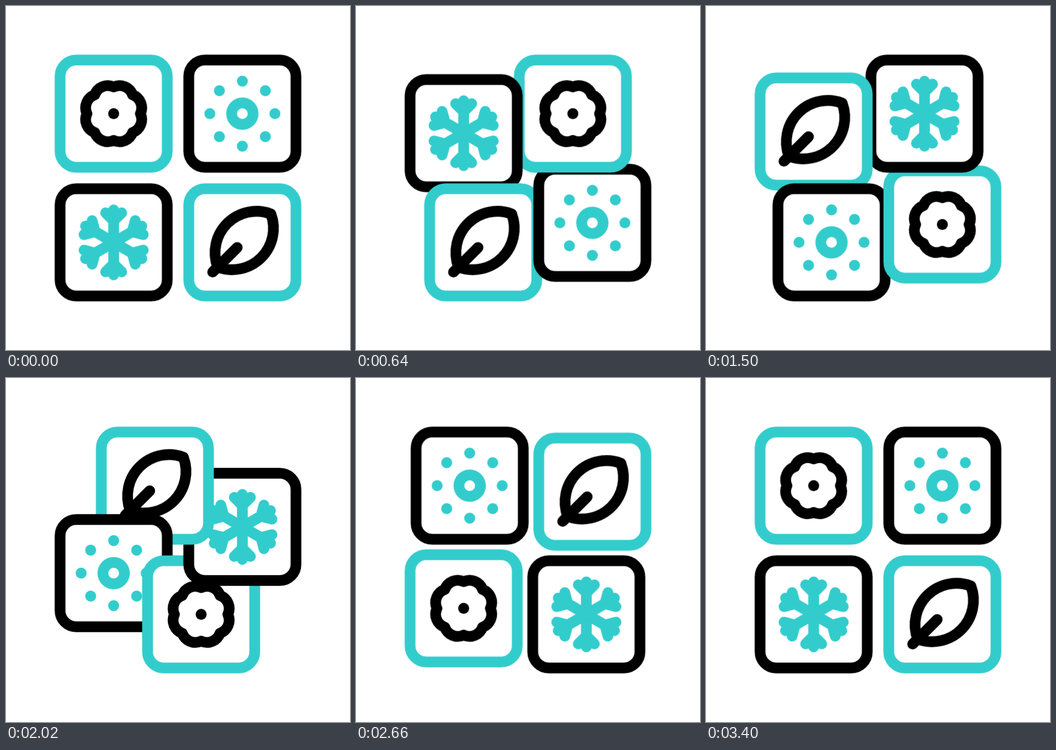
Animation, 640 px wide and 640 px high, one loop 3.8 s. Source, as an HTML page:

```html
<!DOCTYPE html>
<html lang="en">
<head>
<meta charset="utf-8">
<title>Four seasons</title>
<style>
  html, body { margin: 0; height: 100%; overflow: hidden; background: #fff; }
  svg {
    display: block; width: 100vw; height: 100vh;
    fill: none; stroke-width: 20; stroke-linecap: round; stroke-linejoin: round;
  }
  .ink { stroke: #000; }
  .teal { stroke: #33cccc; }
  .dot { stroke-width: 20.4; }
  .card { fill: #fff; }
  .orbit { animation: orbit 3800ms cubic-bezier(.3333, 0, .6667, 1) infinite; }

  /* four 850 ms moves clockwise, then a 400 ms rest */
  @keyframes orbit {
    0%, 89.4737%, 100% { transform: translate(-119.7px, -119.7px); }
    22.3684% { transform: translate(119.7px, -119.7px); }
    44.7368% { transform: translate(119.7px, 119.7px); }
    67.1053% { transform: translate(-119.7px, 119.7px); }
  }
</style>
</head>
<body>
<svg viewBox="-320 -320 640 640">
  <defs>
    <rect id="card" class="card" x="-99.7" y="-99.7" width="199.4" height="199.4" rx="30"/>

    <g id="flower">
      <use href="#card" class="teal"/>
      <path class="ink" d="M0-49.7
        A25.7 25.7 0 0 1 35.14-35.14 A25.7 25.7 0 0 1 49.7 0
        A25.7 25.7 0 0 1 35.14 35.14 A25.7 25.7 0 0 1 0 49.7
        A25.7 25.7 0 0 1-35.14 35.14 A25.7 25.7 0 0 1-49.7 0
        A25.7 25.7 0 0 1-35.14-35.14 A25.7 25.7 0 0 1 0-49.7Z"/>
      <path class="ink dot" d="M0 0h0"/>
    </g>

    <path id="rays" d="M0-60.5h0M0 60.5h0M-60.5 0h0M60.5 0h0"/>
    <g id="sun">
      <use href="#card" class="ink"/>
      <g class="teal">
        <circle r="20"/>
        <use href="#rays" class="dot"/>
        <use href="#rays" class="dot" transform="rotate(45)"/>
      </g>
    </g>

    <g id="leaf">
      <use href="#card" class="teal"/>
      <path class="ink" d="M53-53A77 77 0 0 0-46 46A77 77 0 0 0 53-53Z"/>
      <path class="ink" d="M-55.3 55.3L-9.6 9.6"/>
    </g>

    <path id="arm" d="M0 0V-60.5M-15-55L0-40L15-55"/>
    <g id="snow">
      <use href="#card" class="ink"/>
      <g class="teal">
        <use href="#arm"/>
        <use href="#arm" transform="rotate(60)"/>
        <use href="#arm" transform="rotate(120)"/>
        <use href="#arm" transform="rotate(180)"/>
        <use href="#arm" transform="rotate(240)"/>
        <use href="#arm" transform="rotate(300)"/>
      </g>
    </g>

    <clipPath id="overSun" transform="rotate(90)">
      <rect class="orbit" x="-118" y="-118" width="236" height="236"/>
    </clipPath>
  </defs>

  <g class="orbit"><use href="#flower"/></g>
  <g transform="rotate(270)"><g class="orbit"><use href="#snow" transform="rotate(-270)"/></g></g>
  <g transform="rotate(180)"><g class="orbit"><use href="#leaf" transform="rotate(-180)"/></g></g>
  <g transform="rotate(90)"><g class="orbit"><use href="#sun" transform="rotate(-90)"/></g></g>
  <!-- closes the overlap cycle: flower above sun, yet below snow -->
  <g clip-path="url(#overSun)"><g class="orbit"><use href="#flower"/></g></g>
</svg>
</body>
</html>
```
